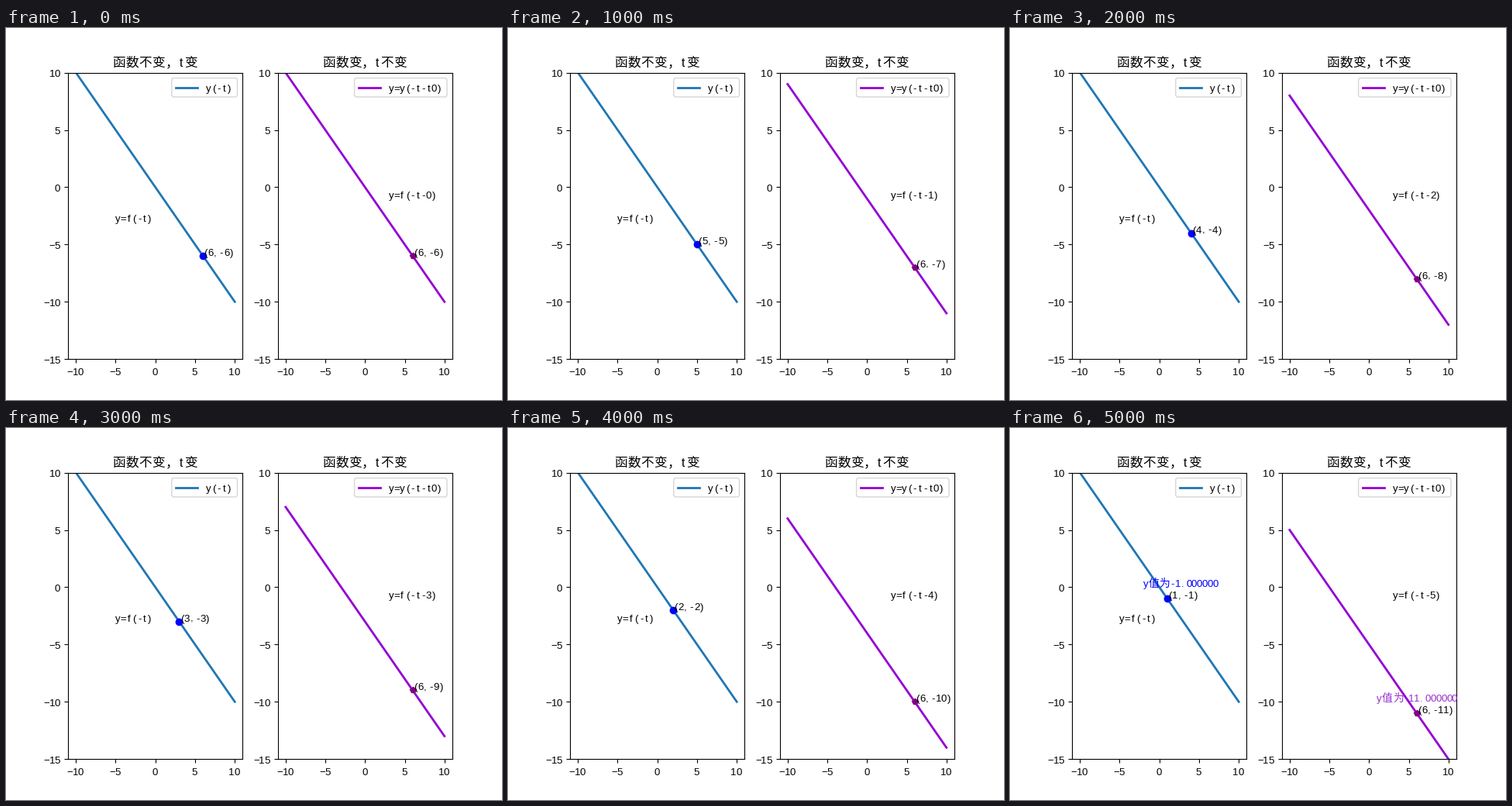
Animation, 640 px wide and 480 px high, one loop 6 s. Source, as a matplotlib script:

```python
import matplotlib.pyplot as plt
from matplotlib.animation import FuncAnimation
from matplotlib.lines import Line2D
from matplotlib.patches import FancyBboxPatch
from matplotlib.transforms import IdentityTransform

plt.rcParams["font.family"] = ["Liberation Sans", "Noto Sans CJK JP"]
PX = 0.72  # points per pixel at 100 dpi

fig, (left, right) = plt.subplots(1, 2, figsize=(6.4, 4.8), dpi=100)


def is_wide(ch):
    return ord(ch) > 0x2E80


def text_width(s, size=10):
    return sum(size if is_wide(ch) else size / 2 for ch in s)


def grid_text(ax, s, xy, coords="data", dx=0, dy=0, align=0, size=10,
              color="black"):
    """Write s in half-em cells (full em for CJK); offsets are in points."""
    x = dx - align * text_width(s, size) - 0.4
    parts = []
    for ch in s:
        cell = size if is_wide(ch) else size / 2
        ha, shift = "center", cell / 2
        if ch == "(":
            ha, shift = "right", cell - 0.5
        elif ch in "),.，":
            ha, shift = "left", 0.5
        parts.append(ax.annotate(
            ch, xy, xytext=(x + shift, dy), xycoords=coords,
            textcoords="offset points", ha=ha, va="baseline", color=color,
            fontsize=size if is_wide(ch) else 0.95 * size))
        x += cell
    return parts


def tick_name(v):
    return str(v).replace("-", "\u2212")


def legend(ax, label, color):
    x1, y1 = ax.transAxes.transform((1, 1))
    em = 10 / PX
    x1, y1 = x1 - em / 2, y1 - em / 2
    w, h = text_width(label) / PX + 3.6 * em, 24.4
    x0, y0 = x1 - w, y1 - h
    ident = IdentityTransform()
    ax.add_artist(FancyBboxPatch(
        (x0, y0), w, h, boxstyle="round,pad=0,rounding_size=0.2",
        mutation_scale=em, fc="white", ec="0.8", alpha=0.8, lw=1,
        transform=ident, zorder=2.5))
    mid = y0 + h / 2
    ax.add_artist(Line2D([x0 + 0.4 * em, x0 + 2.4 * em], [mid, mid],
                         color=color, lw=2, transform=ident, zorder=2.6))
    grid_text(ax, label, (x0 + 3.2 * em, mid - 5), "figure pixels")


def setup(ax, title, label, color):
    ax.set(xlim=(-11, 11), ylim=(-15, 10))
    xs, ys = range(-10, 11, 5), range(-15, 11, 5)
    ax.set_xticks(xs, [""] * len(xs))
    ax.set_yticks(ys, [""] * len(ys))
    for v in xs:
        grid_text(ax, tick_name(v), (v, 0), ("data", "axes fraction"),
                  dy=-14.8, align=0.5)
    for v in ys:
        grid_text(ax, tick_name(v), (0, v), ("axes fraction", "data"),
                  dx=-7, dy=-4, align=1)
    grid_text(ax, title, (0.5, 1), "axes fraction", dy=5.6, align=0.5, size=12)
    legend(ax, label, color)


setup(left, "函数不变，t变", "y(-t)", "C0")
setup(right, "函数变，t不变", "y=y(-t-t0)", "darkviolet")

left.plot([-10, 10], [10, -10], color="C0", lw=2)
shifted, = right.plot([], [], color="darkviolet", lw=2)
dot, = left.plot([], [], "o", color="blue")
mark, = right.plot([], [], "p", color="purple")
grid_text(left, "y=f(-t)", (-5, -3))

STEPS = 6
labels = []


def update(i):
    while labels:
        labels.pop().remove()
    t = 6 - i
    y = -6 - i
    dot.set_data([t], [-t])
    mark.set_data([6], [y])
    shifted.set_data([-10, 10], [10 - i, -10 - i])
    labels.extend(grid_text(left, f"({t},{-t})", (t, -t)))
    labels.extend(grid_text(right, f"(6,{y})", (6, y)))
    labels.extend(grid_text(right, f"y=f(-t-{i})", (3, -1)))
    if i == STEPS - 1:
        labels.extend(grid_text(left, f"y值为{-t:f}", (t - 3, 1 - t),
                                color="blue"))
        labels.extend(grid_text(right, f"y值为{y:f}", (1, y + 1),
                                color="darkorchid"))
    return [dot, mark, shifted, *labels]


anim = FuncAnimation(fig, update, frames=STEPS, interval=1000, repeat=True,
                     repeat_delay=0, blit=False)
plt.show()
```
